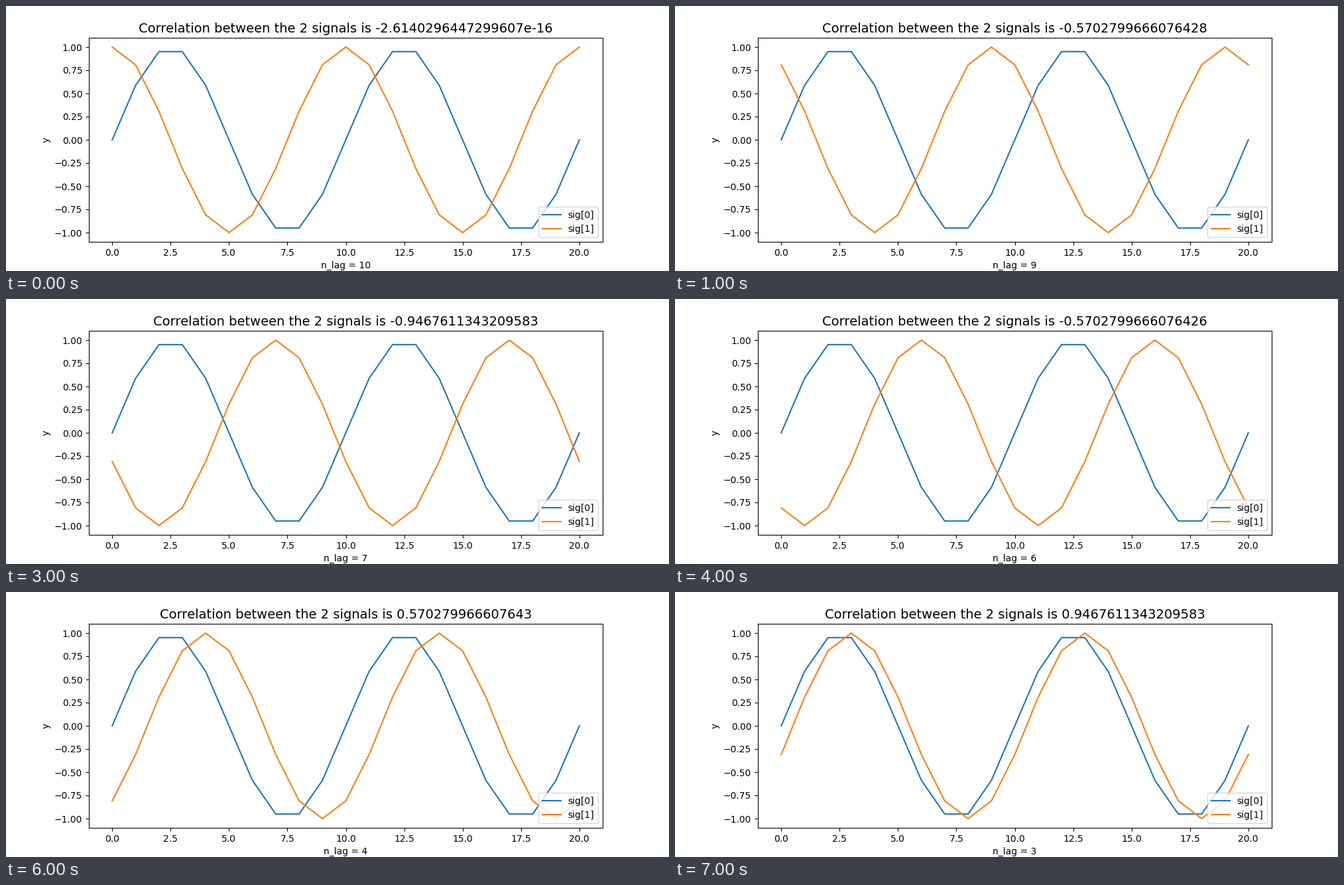
A matplotlib script that plays this animation: 1000x400 px, repeating every 8 s.

```python
import matplotlib.pyplot as plt
import numpy as np
from matplotlib.animation import FuncAnimation

plt.rcParams["font.family"] = "DejaVu Sans"

START_LAG = 10
PERIOD = 10
# Two of the values are pure rounding residue, so the readouts are kept as text.
CORRELATIONS = {
    10: "-2.6140296447299607e-16",
    9: "-0.5702799666076428",
    8: "-0.9467611343209584",
    7: "-0.9467611343209583",
    6: "-0.5702799666076426",
    5: "1.3940465870515132e-16",
    4: "0.570279966607643",
    3: "0.9467611343209583",
}

x = np.arange(21)
omega = 2 * np.pi / PERIOD

fig, ax = plt.subplots(figsize=(10, 4), dpi=100)
ax.plot(x, np.sin(omega * x), label="sig[0]")
shifted, = ax.plot(x, np.cos(omega * x), label="sig[1]")
ax.set_xlim(-1, 21)
ax.set_ylim(-1.1, 1.1)
ax.set_ylabel("y")
ax.legend(loc="lower right")


def update(step):
    lag = START_LAG - step
    shifted.set_ydata(np.cos(omega * (x - lag)))
    ax.set_title(f"Correlation between the 2 signals is {CORRELATIONS[lag]}",
                 fontsize=14)
    ax.set_xlabel(f"n_lag = {lag}")
    return shifted, ax.title, ax.xaxis.label


anim = FuncAnimation(fig, update, frames=len(CORRELATIONS), interval=1000,
                     init_func=lambda: update(0), repeat=True, repeat_delay=0)
plt.show()
```
